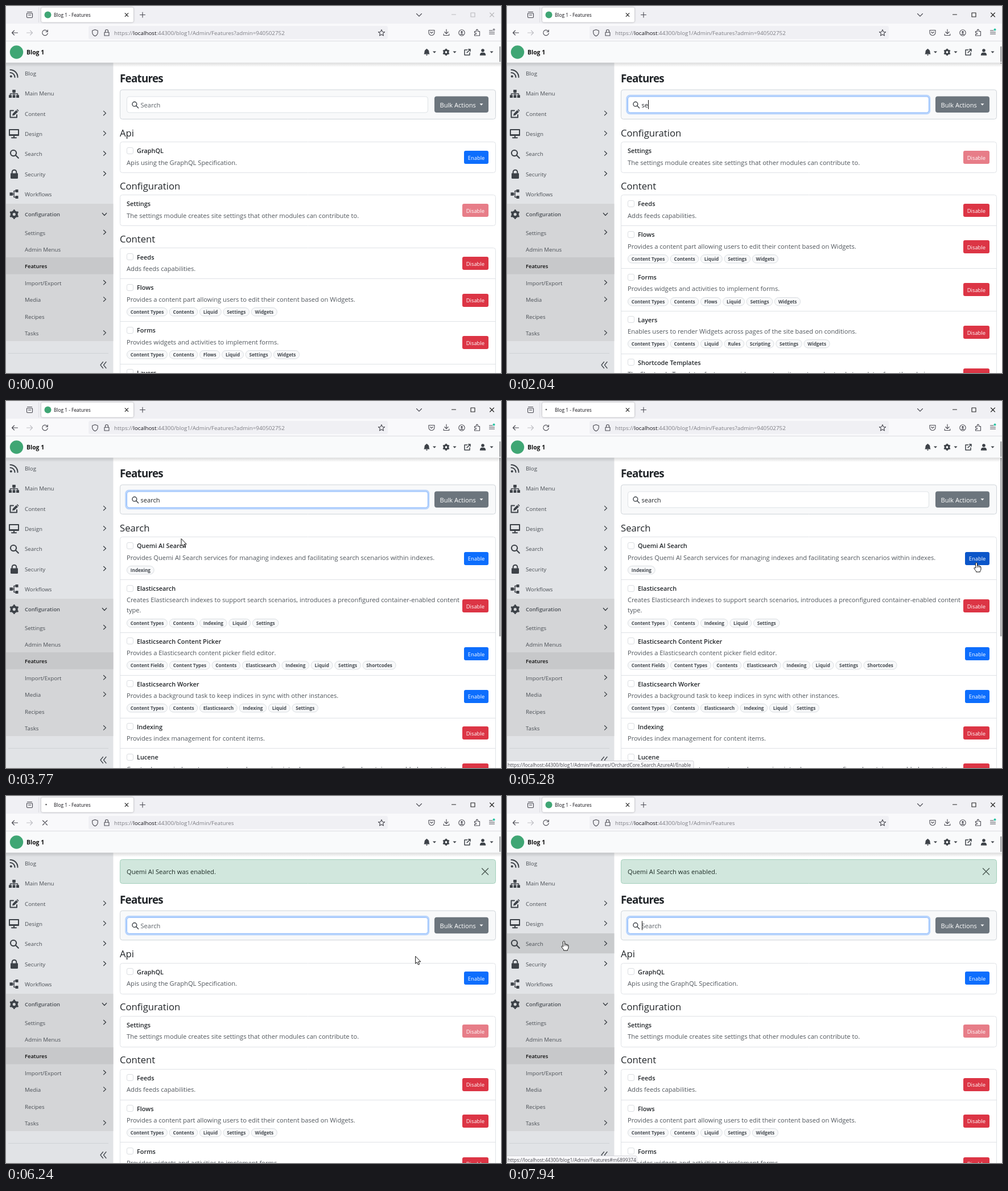
An HTML page with a canvas for the animation above (8 s loop, 870x644 px).

```html
<!DOCTYPE html>
<html lang="en">
<head>
<meta charset="utf-8">
<title>Blog 1 - Features</title>
<style>
html, body { margin: 0; width: 100%; height: 100%; overflow: hidden; background: #fff; }
canvas { display: block; }
</style>
</head>
<body>
<canvas id="stage" width="870" height="644"></canvas>
<script>
const ctx = document.getElementById('stage').getContext('2d');
const LOOP = 8000, ACTIVATE = 1010, CLICK = 5150, RELOAD = 5700, ICONS = 6050, LOADED = 6360;
const INK = '#212529', ICON = '#3d4248', CHROME = '#4a4a52';

// ---- drawing helpers ----
function text(str, x, y, size, color, weight = 400, spacing = 0) {
  ctx.font = `${weight} ${size}px "Open Sans", "Noto Sans", sans-serif`;
  ctx.letterSpacing = spacing + 'px';
  ctx.fillStyle = color;
  ctx.fillText(str, x, y);
  return ctx.measureText(str).width;
}
function rect(x, y, w, h, color) {
  ctx.fillStyle = color;
  ctx.fillRect(x, y, w, h);
}
function box(x, y, w, h, r, fill, stroke, lineWidth = 1) {
  ctx.beginPath();
  ctx.roundRect(x, y, w, h, r);
  if (fill) { ctx.fillStyle = fill; ctx.fill(); }
  if (stroke) { ctx.strokeStyle = stroke; ctx.lineWidth = lineWidth; ctx.stroke(); }
}
function shape(x, y, d, fill, stroke, lineWidth = 1.1) {
  const p = new Path2D(d);
  ctx.save();
  ctx.translate(x, y);
  ctx.lineCap = ctx.lineJoin = 'round';
  if (fill) { ctx.fillStyle = fill; ctx.fill(p); }
  if (stroke) { ctx.strokeStyle = stroke; ctx.lineWidth = lineWidth; ctx.stroke(p); }
  ctx.restore();
}
const line = (x, y, d, color = CHROME, w = 1.1) => shape(x, y, d, null, color, w);
function disc(x, y, r, color) {
  ctx.beginPath();
  ctx.arc(x, y, r, 0, 7);
  ctx.fillStyle = color;
  ctx.fill();
}
function gear(x, y, r) {
  let teeth = '';
  for (let i = 0; i < 6; i++) {
    const a = i * Math.PI / 3 + Math.PI / 6, c = Math.cos(a) * r, s = Math.sin(a) * r;
    teeth += `M${c * .6} ${s * .6}L${c * .85} ${s * .85}`;
  }
  line(x, y, teeth, ICON, r * .42);
  ctx.beginPath();
  ctx.arc(x, y, r * .57, 0, 7);
  ctx.strokeStyle = ICON;
  ctx.lineWidth = r * .5;
  ctx.stroke();
}
const caret = (x, y, color) => shape(x, y, 'M-3-1.5H3L0 1.7Z', color);
const cross = (x, y, r, color, w) => line(x, y, `M${-r} ${-r}L${r} ${r}M${r} ${-r}L${-r} ${r}`, color, w);
const lens = (x, y, r, w) =>
  line(x, y, `M${r * .5} ${-r * .2}A${r * .7} ${r * .7} 0 1 1 ${-r * .9} ${-r * .2}A${r * .7} ${r * .7} 0 1 1 ${r * .5} ${-r * .2}M${r * .35} ${r * .35}L${r} ${r}`, ICON, w);

// ---- data ----
const feature = (name, desc, tags, action) => ({ name, desc: desc.split('\n'), tags: tags ? tags.split(',') : [], action });
const BASE = 'Content Types,Contents,';
const NEW = 'Quemi AI Search';
const API = ['Api', [feature('GraphQL', 'Apis using the GraphQL Specification.', '', 'Enable')]];
const CONFIG = ['Configuration', [feature('Settings', 'The settings module creates site settings that other modules can contribute to.', '', 'Locked')]];
const CONTENT = ['Content', [
  feature('Feeds', 'Adds feeds capabilities.', '', 'Disable'),
  feature('Flows', 'Provides a content part allowing users to edit their content based on Widgets.', BASE + 'Liquid,Settings,Widgets', 'Disable'),
  feature('Forms', 'Provides widgets and activities to implement forms.', BASE + 'Flows,Liquid,Settings,Widgets', 'Disable'),
  feature('Layers', 'Enables users to render Widgets across pages of the site based on conditions.', BASE + 'Liquid,Rules,Scripting,Settings,Widgets', 'Disable'),
  feature('Shortcode Templates', 'The Shortcode Templates feature provides a way to write custom shortcode templates from the admin.', BASE, 'Disable')
]];
const SEARCH = ['Search', [
  feature(NEW, `Provides ${NEW} services for managing indexes and facilitating search scenarios within indexes.`, 'Indexing', 'Enable'),
  feature('Elasticsearch', 'Creates Elasticsearch indexes to support search scenarios, introduces a preconfigured container-enabled content\ntype.', BASE + 'Indexing,Liquid,Settings', 'Disable'),
  feature('Elasticsearch Content Picker', 'Provides a Elasticsearch content picker field editor.', 'Content Fields,' + BASE + 'Elasticsearch,Indexing,Liquid,Settings,Shortcodes', 'Enable'),
  feature('Elasticsearch Worker', 'Provides a background task to keep indices in sync with other instances.', BASE + 'Elasticsearch,Indexing,Liquid,Settings', 'Enable'),
  feature('Indexing', 'Provides index management for content items.', '', 'Disable'),
  feature('Lucene', 'Creates Lucene indexes to support search scenarios, introduces a preconfigured container-enabled content type.', BASE, 'Disable')
]];
const MENU = ['Blog', 'Main Menu', 'Content', 'Design', 'Search', 'Security', 'Workflows', 'Configuration'];
const SUBMENU = ['Settings', 'Admin Menus', 'Features', 'Import/Export', 'Media', 'Recipes', 'Tasks'];
const EXPANDABLE = ['Content', 'Design', 'Search', 'Security', 'Settings', 'Import/Export', 'Media', 'Tasks'];
const KEY_TIMES = [1620, 1820, 2110, 2380, 2640, 2770];
const POINTER = [
  [130, 832, 612], [870, 396, 196], [1010, 345, 176], [1620, 345, 176],
  [3560, 246, 173], [3770, 308, 242], [4050, 404, 262], [4310, 264, 267],
  [4710, 794, 284], [4850, 825, 284], [5900, 825, 284], [6500, 650, 280],
  [6980, 155, 267], [7380, 130, 262], [7540, 104, 234], [7680, 100, 255], [8000, 100, 255]
];

function pointerAt(t) {
  if (t < 130 || (t >= 1620 && t < 3560)) return null;
  const i = POINTER.findIndex(p => p[0] > t);
  const [t0, x0, y0] = POINTER[i - 1], [t1, x1, y1] = POINTER[i];
  let k = (t - t0) / (t1 - t0);
  k = k * k * (3 - 2 * k);
  return { x: x0 + (x1 - x0) * k, y: y0 + (y1 - y0) * k };
}

// ---- browser frame ----
function drawBrowser(t) {
  const active = t >= ACTIVATE, controls = active ? '#222' : '#b8b8bc';
  const loading = t >= CLICK && t < LOADED;
  rect(0, 0, 870, 31, '#f0f0f4');
  rect(0, 31, 870, 31, '#f9f9fb');
  rect(0, 61, 870, 1, '#dcdce0');
  rect(57, 2, 1, 27, '#dcdce2');
  line(41.5, 15.5, 'M-5-2.5H5V3.5Q5 5 3.5 5H-3.5Q-5 5-5 3.5ZM-4-5H4M-2 .5H2');
  ctx.save();
  ctx.shadowColor = 'rgba(0,0,0,.35)';
  ctx.shadowBlur = 3;
  box(62, 2.5, 162, 26, 3, '#fff');
  ctx.restore();
  if (loading) disc(73.2 - 4.3 * Math.cos((t - 5280) / 420 * Math.PI), 15, 1.3, '#555');
  else disc(73.5, 15.5, 6, '#3fa674');
  text('Blog 1 - Features', 84, 19, 8.35, '#15141a');
  cross(212, 15.5, 2.8, '#222');
  line(240, 15.5, 'M-4.5 0H4.5M0-4.5V4.5');
  line(726, 15.5, 'M-4.5-2L0 2.5L4.5-2');
  line(787, 15, 'M-3.5 0H3.5', controls);
  line(820.5, 15.5, 'M-3.5-3.5H3.5V3.5H-3.5Z', controls);
  cross(854, 15.5, 3.5, controls);

  line(15.5, 47, 'M5 0H-5M-1-4L-5 0L-1 4');
  line(41.5, 47, 'M-5 0H5M1-4L5 0L1 4', '#bfbfc4');
  if (t >= 5400 && t < LOADED) cross(68.5, 47, 4, CHROME);
  else line(68.5, 47, 'M4.2-2.5A4.8 4.8 0 1 0 4.8 .8M4.8-5V-1.8H1.5');

  box(145, 35, 526, 23, 3, '#f0f0f4');
  line(156.5, 47, 'M0-5.5L4.8-3.8V-.5Q4.5 4 0 5.8Q-4.5 4-4.8-.5V-3.8Z');
  line(177, 47, 'M-4-.8H4V5H-4ZM-2.5-1V-3A2.5 2.5 0 0 1 2.5-3V-1');
  let x = 190;
  const tail = t < RELOAD ? '?admin=940502752' : '';
  x += text('https://', x, 50.5, 9.8, '#7d7d84');
  x += text('localhost', x, 50.5, 9.8, '#15141a');
  text(':44300/blog1/Admin/Features' + tail, x, 50.5, 9.8, '#7d7d84');
  line(660, 47, 'M0-5.5L1.6-1.8L5.6-1.5L2.6 1.2L3.5 5L0 3L-3.5 5L-2.6 1.2L-5.6-1.5L-1.6-1.8Z');
  line(748, 46.5, 'M-5-4H5V0A5 5 0 0 1-5 0ZM-2.3-1L0 1.2L2.3-1');
  line(774, 46.5, 'M0-5.5V2M-3.2-1L0 2.2L3.2-1M-4.8 2.5V5H4.8V2.5');
  line(801, 47, 'M5.2 0A5.2 5.2 0 1 1-5.2 0A5.2 5.2 0 1 1 5.2 0');
  shape(801, 47, 'M1.8-1.2A1.8 1.8 0 1 1-1.8-1.2A1.8 1.8 0 1 1 1.8-1.2M-3.2 3.2Q0-.5 3.2 3.2Z', CHROME);
  line(828, 47, 'M-4.5-2.5H-1.5V-4.5A1.3 1.3 0 0 1 1.3-4.5V-2.5H4.5V5H-4.5V2.5H-2.5A1.3 1.3 0 0 0-2.5 0H-4.5Z');
  line(854, 46, 'M-4.5-3H1M-4.5 0H4.5M-4.5 3H4.5');
  disc(857.5, 41.5, 2, active ? '#2bc4a4' : '#8f8f96');
}

// ---- page parts ----
function drawNavbar(icons) {
  const shadow = ctx.createLinearGradient(0, 99, 0, 107);
  shadow.addColorStop(0, 'rgba(0,0,0,.15)');
  shadow.addColorStop(1, 'rgba(0,0,0,0)');
  rect(0, 99, 870, 8, shadow);
  rect(0, 62, 870, 37.5, '#f9fafb');
  disc(18.5, 81, 11.7, '#3fa674');
  text('Blog 1', 36, 85, 10.4, '#111', 700);
  for (const cx of icons ? [753, 788.5, 853.5] : [800.5, 821.5, 853.5]) caret(cx, 81, ICON);
  if (!icons) return;
  shape(739.5, 81, 'M0-6Q1-6 1-5Q4-4 4-.5Q4 2 5.2 3.5H-5.2Q-4 2-4-.5Q-4-4-1-5Q-1-6 0-6M-1.6 4.3H1.6Q1 6 0 6Q-1 6-1.6 4.3', ICON);
  gear(773.5, 81, 6);
  line(811, 81, 'M-.5-4H-5V5H4V1M-1 1L5-5M1.5-5H5V-1.5', ICON, 1.5);
  shape(838, 81, 'M2.8-3A2.8 2.8 0 1 1-2.8-3A2.8 2.8 0 1 1 2.8-3M-5.2 5.8Q-5 .8-1.5 .8H1.5Q5 .8 5.2 5.8Z', ICON);
}

function drawMenuIcons() {
  disc(8.8, 123.6, 2, ICON);
  line(7.5, 125, 'M0-8A8 8 0 0 1 8 0M0-13A13 13 0 0 1 13 0', ICON, 2);
  shape(14, 154, 'M-2.8-7H2.8V-2H-2.8ZM-9 2.2H-4V7H-9ZM-2.5 2.2H2.5V7H-2.5ZM4 2.2H9V7H4Z', ICON);
  line(14, 154, 'M0-2V2M-6.5 2V0H6.5V2', ICON, 1.4);
  line(14, 189, 'M-1-5.5H-6.5V6.5H5V2', ICON, 2);
  shape(14, 189, 'M-3 3.5L-2.2 0L4-6.2L7 -3.2L.6 2.8ZM4.8-7L6-8L8.4-5.5L7.6-4Z', ICON);
  line(14, 223, 'M-8-6H8V4H-8ZM0 4V8M-4 8.3H4', ICON, 2);
  shape(14, 223, 'M-8 2H8V5H-8Z', ICON);
  lens(14.5, 259.5, 7.3, 2.1);
  shape(14.5, 295, 'M-6.5-1.5H6.5V6.5Q6.5 8 5 8H-5Q-6.5 8-6.5 6.5Z', ICON);
  line(14.5, 295, 'M-3.8-1.5V-3.5A3.8 3.8 0 0 1 3.8-3.5V-1.5', ICON, 2);
  shape(14, 330, 'M-7.5-2.7H-2V2.7H-7.5ZM2.5-8H7.5V-3H2.5ZM2.5 3H7.5V8H2.5Z', ICON);
  line(14, 330, 'M-2 0H0M3-5.5H0V5.5H3', ICON, 1.5);
  gear(14.3, 365.5, 8);
}

function drawSidebar(icons, pointer) {
  rect(0, 99, 188.5, 545, '#e1e3e6');
  rect(0, 347, 188.5, 241, '#d4d5d7');
  rect(0, 441, 188.5, 29.5, '#c7c8ca');
  if (pointer && pointer.x < 188) {
    const row = Math.floor((pointer.y - 100.5) / 35.2);
    rect(0, Math.round(100.5 + row * 35.2), 188.5, 35.2, '#c9cbcd');
  }
  const item = (label, y, bold) => {
    text(label, 33, y + 3.5, bold ? 9.4 : 9.75, bold === 2 ? '#111' : '#4a4f55', bold ? 600 : 400);
    if (icons && EXPANDABLE.includes(label)) line(173.5, y - 1, 'M-2-3.7L2 0L-2 3.7', '#33383d', 1.2);
  };
  MENU.forEach((label, i) => item(label, 118.5 + i * 35.3, i === 7 ? 1 : 0));
  // The submenu repeats no label from the main menu.
  SUBMENU.forEach((label, i) => item(label, 398 + i * 29.4, i === 2 ? 2 : 0));
  if (icons) {
    drawMenuIcons();
    line(173, 365.5, 'M-3.7-2L0 2L3.7-2', '#33383d', 1.2);
  }
  rect(4, 609, 176, 1, '#cfd2d5');
  line(171, 630, 'M-.5-5.5L-5 0L-.5 5.5M5-5.5L.5 0L5 5.5', ICON, 1.2);
}

function drawButton(action, mid, hovered) {
  const enable = action === 'Enable', x = enable ? 805 : 802;
  const color = enable ? (hovered ? '#0b56c9' : '#0d6efd') : action === 'Locked' ? '#e77d88' : '#dc3545';
  box(x, Math.round(mid - 11.5), 848 - x, 23, 3, color);
  text(enable ? 'Enable' : 'Disable', x + 6.7, mid + 4, 9.4, '#fff');
}

function drawFeature(f, y, h, hovered) {
  const locked = f.action === 'Locked';
  if (!locked) box(212.5, Math.round(y + 9.5) + .5, 11, 11, 2.5, '#fff', '#dadde1');
  text(f.name, locked ? 212 : 230, y + 20, 10.9, INK, 600);
  f.desc.forEach((row, i) => text(row, 212, y + 40.3 + i * 17.9, 11.15, '#50565c'));
  let x = 212.5;
  const top = Math.round(y + 32.6 + f.desc.length * 17.9) + .5;
  for (const tag of f.tags) {
    ctx.font = '700 8.2px "Open Sans", "Noto Sans", sans-serif';
    ctx.letterSpacing = '0px';
    const w = ctx.measureText(tag).width + 12.5;
    box(x, top, w, 14.5, 7.2, '#f8f9fa', '#d9dde1');
    text(tag, x + 6.3, top + 10.5, 8.2, '#454a50', 700);
    x += w + 3.7;
  }
  drawButton(f.action, y + h / 2 + .3, hovered);
}

function drawGroups(groups, y, hoverFirst) {
  for (const [title, features] of groups) {
    text(title, 200, y - 9.5, 16.7, INK);
    const heights = features.map(f => 53.9 + (f.tags.length ? 20.9 : 0) + (f.desc.length - 1) * 18);
    const total = heights.reduce((a, b) => a + b);
    box(200.5, Math.round(y) + .5, 660, Math.round(total), 4, '#fff', '#dfe2e6');
    features.forEach((f, i) => {
      if (i) rect(201, Math.round(y), 659, 1, '#dfe2e6');
      drawFeature(f, y, heights[i], hoverFirst && i === 0);
      y += heights[i];
    });
    y += 39.2;
  }
}

function drawSearchBar(t, dy, icons) {
  const typed = t < RELOAD ? 'search'.slice(0, KEY_TIMES.filter(k => t >= k).length) : '';
  const focused = (t >= ACTIVATE && t < CLICK) || t >= RELOAD;
  box(200.5, 147 + dy, 660, 51.5, 4, '#f8f9fa', '#cfd4d9');
  if (focused) {
    const k = t < RELOAD ? Math.min(1, (t - ACTIVATE) / 150) : 1;
    box(210.8, 157.3 + dy, 532, 31.4, 5, null, `rgba(13,110,253,${.27 * k})`, 3);
  }
  box(212.5, 159 + dy, 529, 28, 4, '#fff', focused ? '#86b7fe' : '#dee2e6');
  if (icons) lens(227, 173.3 + dy, 5.6, 1.4);
  const w = text(typed || 'Search', 236.5, 177.8 + dy, 11.1, typed ? INK : '#5b6167');
  const since = t >= RELOAD ? t - 5680 : t >= 2770 ? t - 2740 : t >= 1620 ? 0 : t - ACTIVATE;
  if (focused && since % 1060 < 500) rect(Math.round(236.5 + (typed ? w : 0)), 165 + dy, 1, 16, '#111');
  box(753, 158.5 + dy, 95, 28.5, 4, '#6c757d');
  text('Bulk Actions', 762.5, 177.8 + dy, 11.1, '#fff');
  caret(835.5, 172.8 + dy, '#fff');
}

function drawMain(t, icons) {
  const reloaded = t >= RELOAD, dy = reloaded ? 54.3 : 0;
  if (reloaded) {
    box(200.5, 111.5, 660, 42, 4, '#d1e7dd', '#a3cfbb');
    text(NEW + ' was enabled.', 212, 137, 11.15, '#1d2b25');
    if (icons) cross(842, 132.5, 5.5, '#4b5a53', 1.4);
  }
  text('Features', 200, 134.3 + dy, 18.8, INK, 700, -.75);
  drawSearchBar(t, dy, icons);
  const filtered = !reloaded && t >= KEY_TIMES[2], narrowed = !reloaded && t >= KEY_TIMES[1];
  const groups = filtered ? [SEARCH] : narrowed ? [CONFIG, CONTENT] : [API, CONFIG, CONTENT];
  drawGroups(groups, 238.3 + dy, filtered && t >= 4830);
  rect(867.5, 71, 1.5, filtered ? 342 : narrowed ? 30 : 27, '#77797c');
}

function drawStatus(t) {
  const root = 'https://localhost:44300/blog1/Admin/Features';
  let label, width;
  if (t >= 4920 && t < 5640) [label, width] = [root + '/OrchardCore.Search.AzureAI/Enable', 328];
  else if (t >= 5640 && t < 6200) [label, width] = ['localhost', 190];
  else if (t >= 7740) [label, width] = [root + '#m6899374', 228];
  if (!label) return;
  box(-3, 631.5, width + 3, 16, 2, '#f9f9fb', '#d3d3d8');
  text(label, 1, 642, 8.35, '#45454c');
}

function drawPointer(t, p) {
  const inField = p.y > 158 && p.y < 188 && p.x < 742;
  const onLink = p.x < 188 || (t > 4800 && t < 5950);
  if (inField) {
    line(p.x, p.y, 'M-2.5-7H-.5L0-6.5L.5-7H2.5M0-6.5V6.5M-2.5 7H-.5L0 6.5L.5 7H2.5', '#222', 1);
  } else if (onLink) {
    shape(p.x, p.y, 'M-1.5 .5Q0-1.5 1.5 .5V5Q3 4 4 5.5Q5.5 4.8 6.2 6.2Q8 5.8 8 7.8V11Q8 13 6.5 14.5V16H-.5V14.5Q-2.5 12.5-4 9.8Q-5-.2-1.5 9Z'.replace('-5-.2', '-4.8 7.4'), '#fff', '#111', 1);
    line(p.x, p.y, 'M1.5 5V8M4 5.5V8M6.2 6.2V8.3', '#111', .8);
  } else {
    shape(p.x, p.y, 'M0 0V12.5L2.8 10L4.8 14.5L7 13.5L5 9.2H8.8Z', '#fff', '#111', 1);
  }
}

function draw() {
  const t = performance.now() % LOOP;
  const icons = t < RELOAD || t >= ICONS;
  const pointer = pointerAt(t);
  rect(0, 0, 870, 644, '#fff');
  drawBrowser(t);
  drawSidebar(icons, pointer);
  drawMain(t, icons);
  drawNavbar(icons);
  rect(867.5, 71, 1.5, 27, '#77797c');
  drawStatus(t);
  if (pointer) drawPointer(t, pointer);
  requestAnimationFrame(draw);
}
draw();
</script>
</body>
</html>
```
